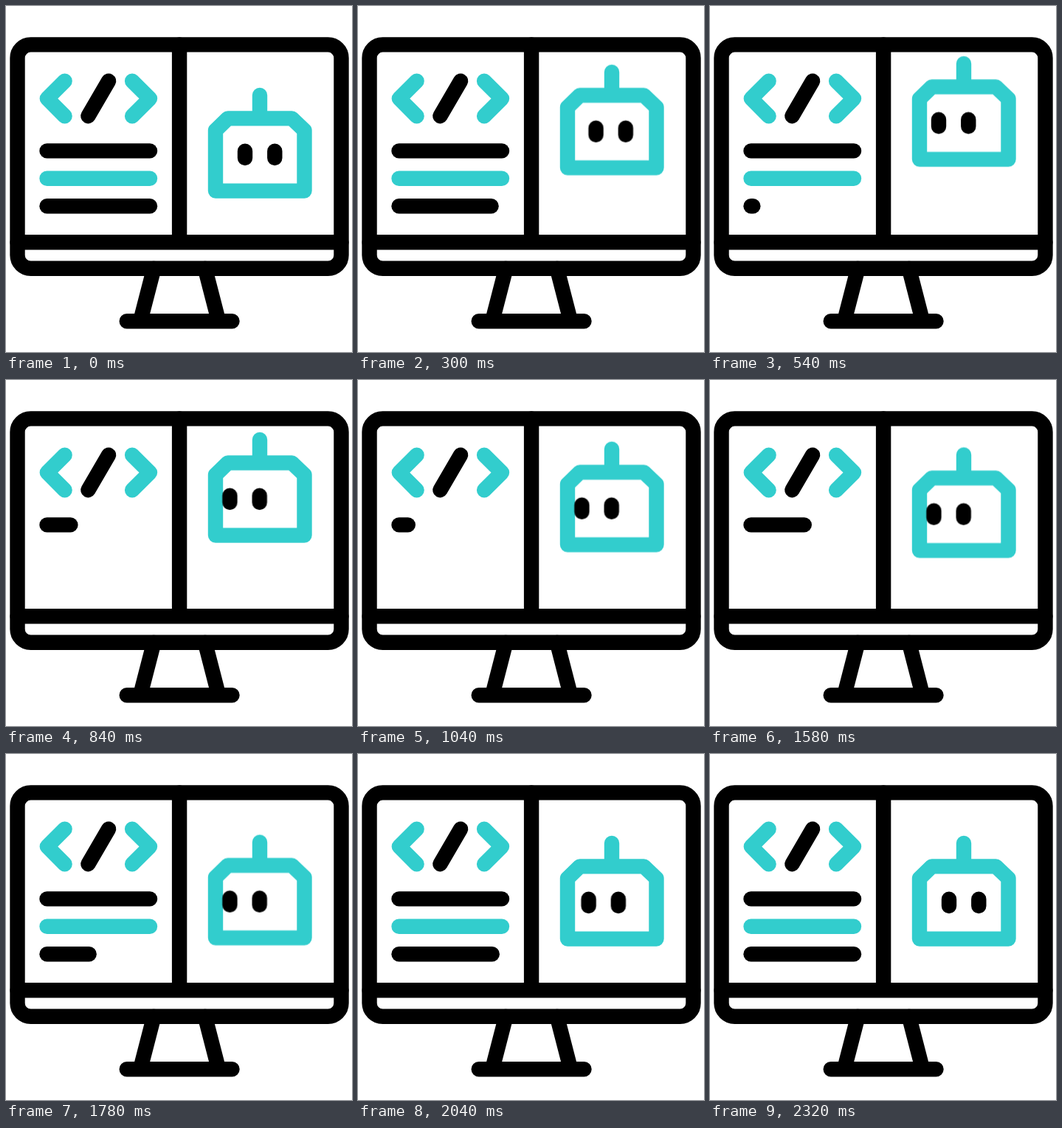
Recreate the animation shown at these times as an HTML page. Size 469 by 469 pixels, loop 2.4 s.

```html
<!DOCTYPE html>
<html lang="en">
<head>
<meta charset="utf-8">
<title>Code and robot</title>
<style>
  @property --drawn {
    syntax: "<number>";
    inherits: true;
    initial-value: 3;
  }

  html, body {
    margin: 0;
    width: 100%;
    height: 100%;
    overflow: hidden;
    background: #fff;
  }

  svg {
    display: block;
    width: 100%;
    height: 100%;
    fill: none;
    stroke: #000;
    stroke-width: 20.4;
    stroke-linecap: round;
    stroke-linejoin: round;
  }

  .teal { stroke: #32cdcd; }

  .lines, .robot, .eyes { animation: 2400ms linear infinite; }
  .lines { animation-name: type; }
  .robot { animation-name: jump; }
  .eyes { animation-name: look; }

  /* --drawn counts visible lines; each line shows its own share */
  .lines path {
    --part: clamp(0, var(--drawn) - var(--i), 1);
    stroke-dasharray: calc(var(--part) * 139.5px) 300px;
    opacity: clamp(0, (var(--drawn) - var(--i)) * 1000, 1);
  }

  @keyframes type {
    0% { --drawn: 3; }
    2.5% { --drawn: 3; animation-timing-function: cubic-bezier(.8, 0, .1, 1); }
    48.6% { --drawn: .07; }
    52.1% { --drawn: .07; animation-timing-function: cubic-bezier(.69, 0, .03, 1); }
    96.67%, 100% { --drawn: 3; }
  }

  @keyframes jump {
    0% { transform: translateY(0); }
    .83% { transform: translateY(0); animation-timing-function: cubic-bezier(.33, 0, .25, 1); }
    25.83% { transform: translateY(-43.3px); animation-timing-function: cubic-bezier(.33, 0, .67, .11); }
    51.46% { transform: translateY(0); animation-timing-function: cubic-bezier(.33, .67, .67, 1); }
    63.33% { transform: translateY(-20.6px); animation-timing-function: cubic-bezier(.33, 0, .67, .33); }
    74.6%, 100% { transform: translateY(0); }
  }

  @keyframes look {
    0% { transform: translateX(0); }
    9% { transform: translateX(0); animation-timing-function: cubic-bezier(.33, 0, .67, 1); }
    30.7% { transform: translateX(-20.6px); }
    75% { transform: translateX(-20.6px); animation-timing-function: cubic-bezier(.33, 0, .67, 1); }
    96.67%, 100% { transform: translateX(0); }
  }
</style>
</head>
<body>
<svg viewBox="0 0 469 469">
  <g class="monitor">
    <rect x="15.5" y="52.4" width="439" height="303.4" rx="18"/>
    <path d="M235.1 52.4V320.2M15.5 320.2H454.5"/>
    <path d="M200.4 356L182 427.3M269.8 356L288.2 427.3M163.7 427.3H306.5"/>
  </g>

  <g class="code">
    <path class="teal" d="M79.6 101.7L55.8 125.4L79.6 149.2M171.1 101.7L195 125.4L171.1 149.2"/>
    <path d="M139.1 101.7L111.4 149.2"/>
  </g>

  <g class="lines">
    <path style="--i:0" d="M55.5 196.4H195"/>
    <path style="--i:1" class="teal" d="M55.5 233.7H195"/>
    <path style="--i:2" d="M55.5 271.2H195"/>
  </g>

  <g class="robot">
    <path class="teal" d="M284 250.6H404.5V168.6L387.5 152.4H300.7L284 168.6ZM344 152.4V121"/>
    <g class="eyes">
      <path d="M324 196.7V206M364.3 196.7V206"/>
    </g>
  </g>
</svg>
</body>
</html>
```
